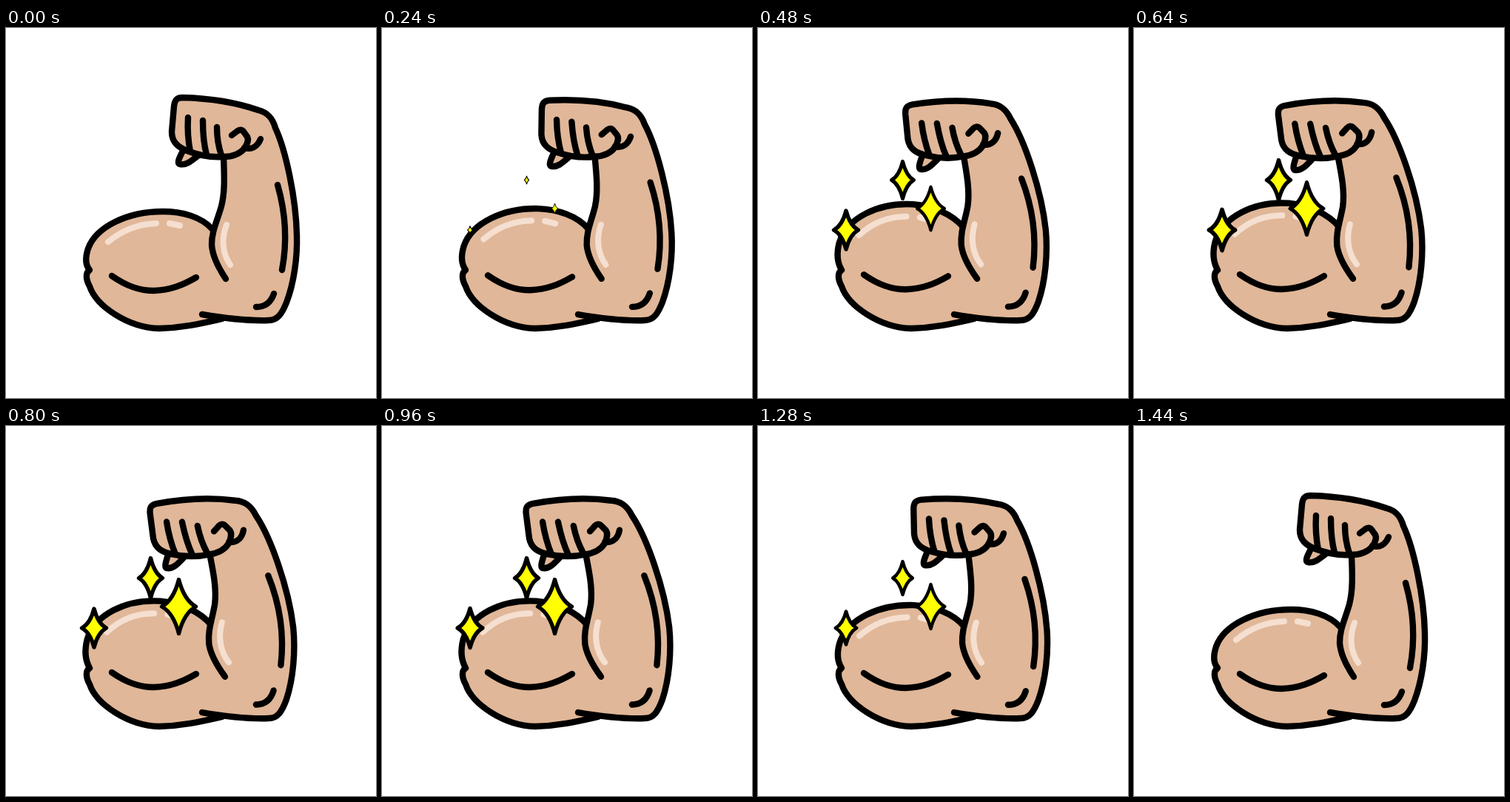
Write an HTML page that moves like this. It is 500 by 500 pixels and loops after 1.92 s.

```html
<!DOCTYPE html>
<html lang="en">
<head>
<meta charset="utf-8">
<title>Flexed arm</title>
<style>
  html, body { margin: 0; width: 100%; height: 100%; overflow: hidden; background: #fff; }
  svg { display: block; width: 100vw; height: 100vh; }
  path { fill: none; stroke: #000; stroke-width: 8.4; stroke-linecap: round; stroke-linejoin: round; }
  .skin { fill: #e0b798; }
  .bare { stroke: none; }
  .shine { stroke: #f5dfd0; stroke-width: 8; }
  .star { fill: #ff0; stroke-width: 5.4; }
</style>
</head>
<body>
<svg id="stage" viewBox="0 0 500 500"></svg>
<script>
const LOOP = 1920, STEP = 80, FIRST = 3;
const BEND = [.345, .53, .71, .86, .95, .99, 1, 1, 1, 1, 1, 1, .85, .52, .16];

const SHELL = 'M265 387 C300 393 330 396 355 395 C367 395 373 386 379 371 ' +
  'C389 345 394 310 393 280 C392 230 378 165 364 135 C360 121 353 114 341 111 ' +
  'C312 101 275 95 239 94 C230 94 228 98 227 106 L224 140 C224 154 232 161 245 166 C265 174 280 175 294 174';
const INNER = 'C295 200 296 222 291 241 C285 262 278 274 278 293 C279 309 287 324 297 339';

// Bends the forearm around the elbow.
function bend(x, y, p) {
  const u = Math.max(0, 390 - y);
  return [x - .0004 * p * u * u, y + .00072 * p * u * (290 - x)];
}

// Lifts the top of the biceps.
function bulge(x, y, p) {
  const w = p * Math.sqrt(Math.max(0, 327 - y) / 80) * (1 - (x / 290) ** 4);
  return [x - w * x / 50, y - 16 * w];
}

const lift = (x, y, p) => [x, y - 2 * p];

const PARTS = [
  [bulge, 'skin', 'M279 272 C264 255 238 248 212 248 C165 248 122 268 111 298 ' +
    'C107 310 107 320 113 327 C107 331 108 340 113 349 C122 376 165 405 207 406 C240 405 265 399 292 393'],
  [lift, '', 'M143 335 C163 349 180 355 200 355 C222 354 238 348 257 337'],
  [bulge, 'shine', 'M138 289 C155 275 175 265 203 264 M221 264 L235 267'],
  [bend, 'skin', 'M239 166 C235 174 230 183 235 184 C243 186 250 180 259 173'],
  [bend, 'skin bare', SHELL + INNER + 'L272 318Z'],
  [bend, 'shine', 'M298 266 C291 284 292 304 303 320'],
  [bend, '', 'M294 174 ' + INNER],
  [bend, '', SHELL],
  [bend, '', 'M294 174 C306 174 316 170 322 163 C327 155 328 151 326 147 L321 140 C319 137 316 137 313 139 L305 145'],
  [bend, '', 'M322 162 C332 165 340 160 344 150'],
  [bend, '', 'M246 121 C245 138 246 152 249 167 M266 125 C266 142 267 156 271 171 M285 134 C285 148 287 160 291 172'],
  [bend, '', 'M367 212 C378 250 380 290 373 327'],
  [bend, '', 'M338 377 C350 377 358 371 362 359']
];

const STARS = [
  { x: 119, y: 273, h: 26, w: 16.5,
    size: [.21, .5, .8, 1, 1.06, 1.06, 1.02, 1, 1, 1.02, 1.04, 1.04, .98, .86, .42] },
  { x: 195.5, y: 205.5, h: 27, w: 16,
    size: [.2, .46, .72, .93, .98, 1, 1, 1, 1, 1, 1, 1, .95, .83, .4] },
  { x: 233.5, y: 244, h: 36.5, w: 23,
    size: [.18, .4, .62, .8, .9, .97, 1, 1, 1, 1, 1, 1, .95, .82, .4] }
];

const stage = document.getElementById('stage');

function addPath(cls, d) {
  const el = document.createElementNS('http://www.w3.org/2000/svg', 'path');
  el.setAttribute('class', cls);
  el.setAttribute('d', d);
  return stage.appendChild(el);
}

function starPath(w, h) {
  const a = w * .31, b = h * .24;
  return `M0 ${-h}Q${a} ${-b} ${w} 0Q${a} ${b} 0 ${h}Q${-a} ${b} ${-w} 0Q${-a} ${-b} 0 ${-h}Z`;
}

function warp(d, fn, p) {
  return d.replace(/(\d+) (\d+)/g, (_, x, y) => fn(+x, +y, p).map(v => v.toFixed(2)).join(' '));
}

const limbs = PARTS.map(([fn, cls, d]) => ({ fn, d, el: addPath(cls, d) }));
for (const s of STARS) s.el = addPath('star', starPath(s.w, s.h));

let shown = -1;
function draw(now) {
  const step = Math.floor(now % LOOP / STEP);
  if (step === shown) return;
  shown = step;
  const i = step - FIRST;
  for (const { fn, d, el } of limbs) el.setAttribute('d', warp(d, fn, BEND[i] || 0));
  for (const s of STARS) {
    const k = s.size[i] || 0;
    s.el.style.display = k ? '' : 'none';
    s.el.setAttribute('transform', `translate(${s.x} ${s.y}) scale(${k})`);
  }
}

const start = performance.now();
function tick() {
  draw(performance.now() - start);
  requestAnimationFrame(tick);
}
tick();
</script>
</body>
</html>
```
